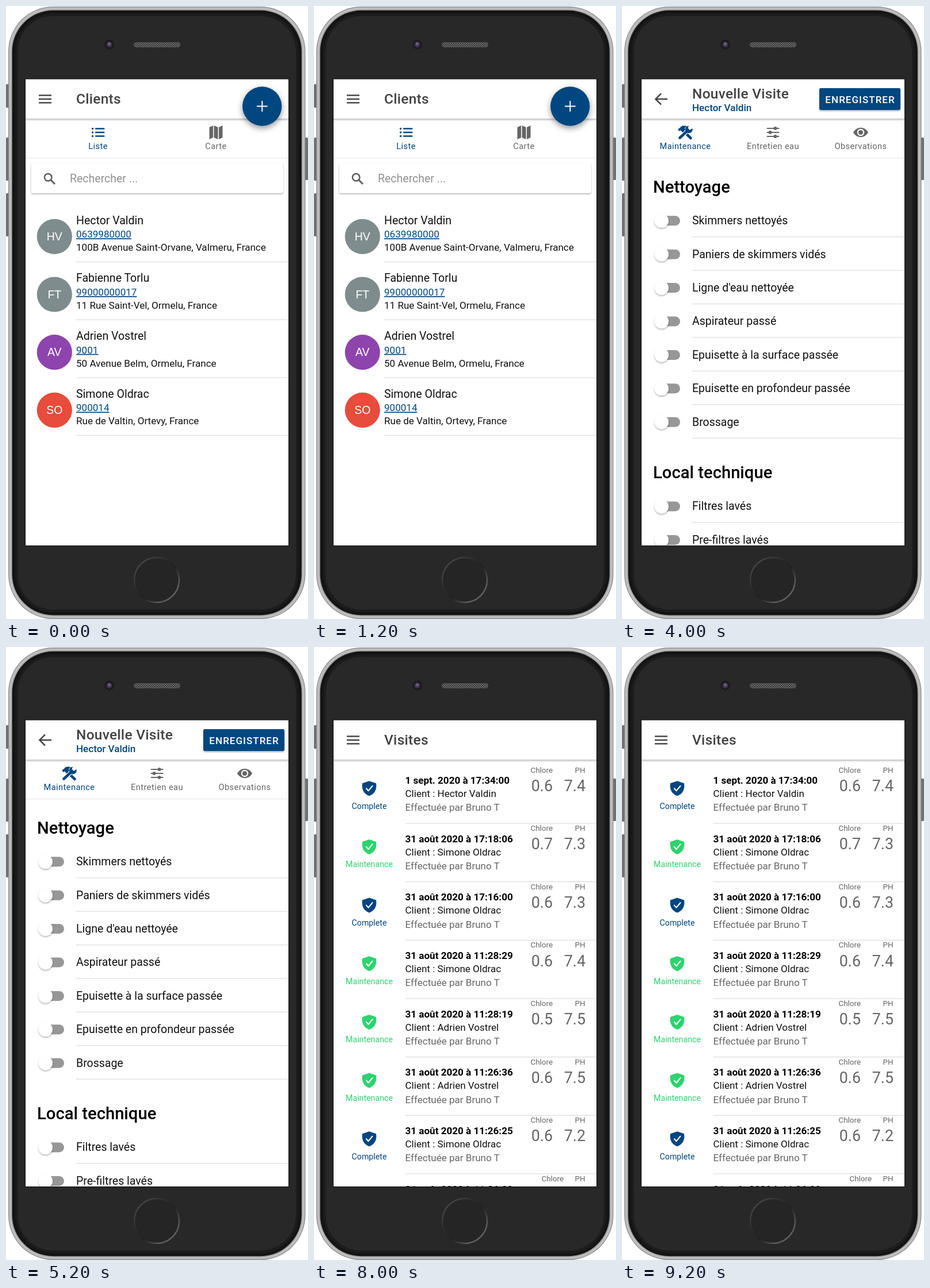
These frames come from a looping animation (525x1067 px, 10000 ms). An HTML page:

```html
<!DOCTYPE html>
<html lang="fr">
<head>
<meta charset="utf-8">
<title>Suivi de piscines</title>
<style>
  html, body { margin: 0; width: 100%; height: 100%; overflow: hidden; background: #fff; }
  svg { display: block; width: 525px; height: 1067px; font-family: Roboto, sans-serif; }
  text { white-space: pre; }
</style>
</head>
<body>
<svg id="stage" viewBox="0 0 525 1067" xmlns="http://www.w3.org/2000/svg"></svg>
<script>
const NAVY = '#004680', GREEN = '#2dd36f', GREY = '#666', INK = '#424242', LINE = '#dcdcdc';
const HOLD = 2000;
// Type sizes of the app, scaled to the stage
const XS = 13.4, S = 14.6, M = 17.06, L = 19.5, XL = 24.4, XXL = 29.2;

const client = 'Hector Valdin', phone = '0639980000';
const address = '100B Avenue Saint-Orvane, Valmeru, France';

const text = (x, y, s, size = L, fill = '#111', o = {}) =>
  `<text x="${x}" y="${y}" font-size="${size}" fill="${fill}" font-weight="${o.w || 400}"` +
  ` text-anchor="${o.a || 'start'}" letter-spacing="${o.ls || 0}em" ${o.x || ''}>${s}</text>`;
const mid = (x, y, s, size, fill, o = {}) => text(x, y, s, size, fill, { ...o, a: 'middle' });
const link = (x, y, s, size) => text(x, y, s, size, NAVY, { x: 'text-decoration="underline"' });
const rect = (x, y, w, h, fill, rx = 0, extra = '') =>
  `<rect x="${x}" y="${y}" width="${w}" height="${h}" rx="${rx}" fill="${fill}" ${extra}/>`;
const circle = (x, y, r, fill, extra = '') => `<circle cx="${x}" cy="${y}" r="${r}" fill="${fill}" ${extra}/>`;
const path = (d, fill, extra = '') => `<path d="${d}" fill="${fill}" ${extra}/>`;
const stroke = (d, color, width = 2, extra = '') =>
  `<path d="${d}" fill="none" stroke="${color}" stroke-width="${width}" ${extra}/>`;
const at = (x, y, body, more = '') => `<g transform="translate(${x} ${y}) ${more}">${body}</g>`;
const rule = (x, y) => rect(x, y - .6, 491 - x, 1.2, LINE);
const heading = (y, s, fill = '#000') => text(54, y, s, XXL, fill, { w: 500 });
const SHADOW = 'filter="url(#shadow)"';

// Icons are drawn around their own centre
const icon = {
  list: c => [-6.5, 0, 6.5].map(y => circle(-9.4, y, 1.7, c) + rect(-5, y - 1.3, 16.5, 2.6, c, 1)).join(''),
  map: c => path('M-11.5-9L-5-12V9L-11.5 12ZM-3.5-12L3.5-9V12L-3.5 9ZM5-9L11.5-12V9L5 12Z', c),
  tools: c => stroke('M-6-5L9.5 10', c, 4.6, 'stroke-linecap="round"') +
    path('M-13-5L-6-11Q-1-13 3-10L-1-8L0-5L-5 0L-8-4L-10-2Z', c) +
    stroke('M-9 9.5L5-4', '#fff', 7) + stroke('M-9.5 9.5L5-4', c, 4.6, 'stroke-linecap="round"') +
    path('M12.5-7A6.4 6.4 0 1 1 6-11.5L4.5-7L7.5-4Z', c),
  sliders: c => [[-7, 4], [0, -5], [7, 4]].map(([y, x]) =>
    rect(-11, y - 1.1, 22, 2.2, c, 1) + circle(x, y, 2.9, c)).join(''),
  eye: c => path('M-13 0C-7-11 7-11 13 0C7 11-7 11-13 0Z', c) + circle(0, 0, 6.2, '#fff') + circle(0, 0, 4.1, c),
  shield: c => path('M0-13L12-9C14 3 8 10 0 13C-8 10-14 3-12-9Z', c) +
    stroke('M-5 0L-1.5 4L5.5-4.5', '#fff', 2.1, 'stroke-linecap="round" stroke-linejoin="round"'),
  thermometer: c => stroke('M-3.2 3V-9A3.2 3.2 0 0 1 3.2-9V3A5.6 5.6 0 1 1-3.2 3Z', c, 1.9) +
    circle(0, 7.3, 3.4, c) + stroke('M0-6V7', c, 2.2),
  bolt: c => stroke('M2-9L-6 2H-.5L-2 9L6-2H.5Z', c, 1.3, 'stroke-linejoin="round"')
};

const menu = [155.5, 162, 168.4].map(y => rect(57, y - 1.2, 22, 2.4, INK)).join('');
const back = stroke('M79 162H59M68 152.4L58.4 162L68 171.6', INK, 2.5);
const header = (left, title, y = 170) =>
  rect(34, 196, 457, 5, 'url(#drop)') + left + text(122, y, title, XL, INK, { w: 500, ls: .0125 });
const tabs = (items, active) => rect(34, 264, 457, 1, '#e6e6e6') + items.map(([x, label, name], i) => {
  const color = i === active ? NAVY : GREY;
  return at(x, 220, icon[name](color)) + mid(x, 249, label, S, color, { ls: .03 });
}).join('');
const button = (x, y, w, h, fill, label, cx, base, size = S, rx = 5) =>
  rect(x, y, w, h, fill, rx, SHADOW) + mid(cx, base, label, size, '#fff', { w: 500, ls: .06 });

function clients() {
  const people = [
    [client, phone, address, 'HV', '#7f8c8d'],
    ['Fabienne Torlu', '99000000017', '11 Rue Saint-Vel, Ormelu, France', 'FT', '#7f8c8d'],
    ['Adrien Vostrel', '9001', '50 Avenue Belm, Ormelu, France', 'AV', '#8e44ad'],
    ['Simone Oldrac', '900014', 'Rue de Valtin, Ortevy, France', 'SO', '#e74c3c']
  ];
  return header(menu, 'Clients') +
    tabs([[160, 'Liste', 'list'], [365, 'Carte', 'map']], 0) +
    circle(445.2, 174.5, 34.2, NAVY, 'filter="url(#lift)"') +
    stroke('M436 174.5H454.6M445.3 165.2V183.8', '#fff', 2) +
    rect(44, 274, 437.5, 51.5, '#fff', 2.4, SHADOW) +
    circle(73.2, 298.2, 6.3, 'none', 'stroke="#5e5e5e" stroke-width="2.5"') +
    stroke('M78 303L85 310', '#5e5e5e', 3) +
    text(111, 306.5, 'Rechercher ...', L, '#929292') +
    people.map(([name, tel, place, initials, color], i) => at(0, i * 100.7,
      circle(84.3, 401.3, 30.6, color) +
      mid(84.3, 408, initials, 19.5, '#fff', { x: 'font-family="Liberation Sans, sans-serif"' }) +
      text(122, 379.5, name) + link(122, 403.3, tel, M) + text(122, 426.3, place, M) + rule(122, 445.4))).join('');
}

function aerial() {
  let seed = 17;
  const rnd = () => (seed = seed * 16807 % 2147483647) / 2147483647;
  const pick = list => list[Math.floor(rnd() * list.length)];
  const blob = (x, y, r, fill, opacity) =>
    `<ellipse cx="${x.toFixed(1)}" cy="${y.toFixed(1)}" rx="${r.toFixed(1)}" ry="${(r * .85).toFixed(1)}" fill="${fill}" opacity="${opacity}"/>`;
  const crowns = ['#343a33', '#3c4338', '#454a3d', '#2f3531', '#3a403c', '#504f43'];
  // Each tree is a dark shadow with a lighter crown beside it
  let trees = '';
  for (let i = 0; i < 650; i++) {
    const x = 34 + rnd() * 457, y = 472 + rnd() * 297, r = 2 + rnd() * 5.5;
    trees += blob(x - r * .6, y - r * .5, r * 1.1, '#191d1d', .6) + blob(x, y, r, pick(crowns), .8);
  }
  // centre, size and tilt of each roof
  const roofs = [
    [296, 510, 22, 32, 8], [411, 486, 38, 22, 12], [111, 558, 38, 26, -8], [432, 559, 40, 28, 10],
    [203, 628, 50, 26, 5], [118, 640, 54, 28, 6], [468, 666, 36, 38, 20], [384, 678, 38, 26, -20],
    [39, 566, 14, 28, 0], [132, 710, 52, 22, 4], [42, 714, 16, 40, 5], [382, 744, 46, 20, -6]
  ];
  const tiles = ['#93594a', '#86594e', '#b36a4b', '#a58a80', '#7d5850', '#968079'];
  const houses = roofs.map(([x, y, w, h, tilt], i) => at(x, y,
    rect(-w / 2 - 5, -h / 2 + 2, w + 12, h + 10, '#77716a', 5, 'opacity=".6"') +
    rect(-w / 2 - 5, -h / 2 - 4, w, h, '#17191b', 2, 'opacity=".7"') +
    rect(-w / 2, -h / 2, w * .6, h * .8, tiles[i % 6]) +
    rect(-w * .1, -h * .3, w * .6, h * .75, tiles[i % 6]) +
    rect(-w / 2, -h * .1, w * .8, h * .3, '#2f2725', 0, 'opacity=".4"') +
    rect(-w / 4, h / 2 - 3, w * .6, 5, '#c3bbb0'), `rotate(${tilt})`)).join('');
  const pools = [[106, 607, 26, 8], [216, 661, 22, 7], [111, 667, 24, 6], [394, 704, 26, 10]]
    .map(([x, y, w, h]) => rect(x - w / 2 - 4, y - h / 2 - 3, w + 8, h + 6, '#a1998d', 4) +
      rect(x - w / 2, y - h / 2, w, h, '#69b9c6', 4)).join('');
  return rect(34, 472, 457, 297, '#30352f') + `<g filter="url(#soft)">${trees}` +
    path('M240 590L325 585L338 635L270 655L238 630Z', '#3c4236', 'opacity=".6"') +
    path('M355 545L410 580L425 635L365 630Z', '#3a4035', 'opacity=".6"') +
    stroke('M54 472L63 600L72 700L68 769', '#606368', 13) +
    stroke('M359 472Q348 525 350 560T346 640Q361 680 357 720L342 769', '#5f605f', 7) +
    stroke('M328 590Q345 625 350 645Q358 668 368 700', '#9a958c', 4) +
    stroke('M80 592L150 604M172 645L238 654M78 696L165 684', '#777168', 4) +
    houses + pools + '</g>' + stroke('M34 599H491M247 472V769', '#ffffff14', 1);
}

function details() {
  const label = (y, s) => text(54, y, s, S, '#222');
  const halo = 'stroke="#222" stroke-width="2.5" paint-order="stroke" stroke-linejoin="round"';
  const dots = [153.5, 162, 170.4].map(y => circle(462, y, 2.6, INK)).join('');
  const map = aerial() +
    text(404, 542, 'B-Manor Vostel', M, '#eee', { w: 500, x: halo }) +
    at(63.5, 531, text(0, 0, 'enue Saint-Orvane', 16, '#eee', { w: 500, x: halo }), 'rotate(90)') +
    path('M262 619C260 603 246 598 246 585A16 16 0 0 1 278 585C278 598 264 603 262 619Z', '#ea4335', 'stroke="#fff" stroke-width="2"') +
    circle(262, 584.5, 5.8, '#811411') +
    rect(47, 484, 236, 48, '#fff', 2.4) + rect(146.5, 484, 1, 48, '#ddd') +
    mid(96.5, 515, 'Map', 21.9, '#666') + mid(214.5, 515, 'Satellite', 21.9, '#000', { w: 500 }) +
    rect(431, 484, 48.5, 48, '#fff', 2.4) +
    stroke('M445.5 504V498.5H451M459 498.5H464.5V504M464.5 512V517.5H459M451 517.5H445.5V512', GREY, 3) +
    rect(431, 691, 48.5, 49, '#fff', 2.4) + rect(446.5, 698, 17, 35, '#f5b326', 8.5) +
    circle(54, 751.5, 10.5, '#fff') +
    rect(101, 752, 390, 17, '#f5f5f5', 0, 'opacity=".68"') +
    text(398, 765, 'Map data ©2020 Imagery ©2020 , Ludra Technologies', 12.2, '#444', { a: 'end' }) +
    rect(404.5, 755, 1, 12, '#555') + text(484, 765, 'Terms of Use', 12.2, '#444', { a: 'end' });
  return header(back, client) + dots +
    label(219.5, 'Telephone mobile') + link(54, 246, phone, L) +
    label(298, 'Telephone fixe') + label(344, 'Email') + link(54, 360, 'hector.val@example.org', L) +
    button(56.5, 370, 252.5, 30, NAVY, 'ACTIVER LE COMPTE CLIENT', 193, 389.5) +
    at(75.5, 385, icon.bolt('#fff')) +
    label(440.5, 'Adresse') + link(54, 466.7, address, L) +
    `<g clip-path="url(#mapClip)">${map}</g>` +
    heading(828, 'Piscines', NAVY) + text(54, 888, 'Principale') +
    rect(144, 863, 149.5, 24.5, NAVY, 5) +
    mid(219, 880, '1 visites éffectuées', 15.8, '#fff', { w: 700 }) +
    text(54, 912, 'Derniere visite effectuee le 1 sept. 2020', M, NAVY) +
    button(56.5, 923, 117, 30, NAVY, 'COMPLETE', 115, 943) +
    button(178, 923, 151, 30, GREEN, 'MAINTENANCE', 253.5, 943);
}

const visitHeader = active => header(back, 'Nouvelle Visite', 161) +
  text(122, 183, client, M, NAVY, { w: 500 }) +
  button(343, 143, 141, 38, NAVY, 'ENREGISTRER', 414, 168.6, M, 2.4) +
  tabs([[110, 'Maintenance', 'tools'], [262.5, 'Entretien eau', 'sliders'], [415, 'Observations', 'eye']], active);

function maintenance() {
  const toggles = (top, labels) => labels.map((s, i) => at(0, top + i * 58.4,
    rect(58, -8.5, 43, 17, '#979797', 8.5) + circle(68.8, 0, 12.2, '#fff', SHADOW) +
    text(122, 6.3, s) + rule(122, 28))).join('');
  return visitHeader(0) + heading(325, 'Nettoyage') +
    toggles(373.8, ['Skimmers nettoyés', 'Paniers de skimmers vidés', "Ligne d'eau nettoyée", 'Aspirateur passé',
      'Epuisette à la surface passée', 'Epuisette en profondeur passée', 'Brossage']) +
    heading(822, 'Local technique') + toggles(871, ['Filtres lavés', 'Pre-filtres lavés']);
}

function water() {
  const scale = (y, cells) => cells.map(([x, w, s, color]) =>
    rect(x, y, w, 54.5, color) + mid(x + w / 2, y + 34, s, L, '#111')).join('');
  const box = (x, y) => rect(x, y, 73, 51, '#fff', 3, `stroke="${NAVY}" stroke-width="2"`);
  const fields = [[127.5, 'Sel'], [262.5, 'TAC'], [398, 'Stabilisant']]
    .map(([x, s]) => mid(x, 782.3, s, L, '#111') + box(x - 36.3, 787.7)).join('');
  return visitHeader(1) + heading(325, 'Analyse') + text(54, 376, 'Chlore') +
    scale(390, [[62, 58, '0.1', '#c7c4d9'], [126, 58, '0.3', '#d2afca'], [190, 57.5, '0.6', '#d09fc4'],
      [253, 45, '1', '#db8ebc'], [304, 58, '1.5', '#e85dac'], [368, 44.5, '2', '#f042a3'], [418, 45, '3', '#f422a1']]) +
    text(54, 502.5, 'PH') +
    scale(517, [[62, 63, '6.8', '#d2ae61'], [130, 62, '7', '#d2ae61'], [198, 62, '7.2', '#e29e63'],
      [266, 61.5, '7.4', '#e8815b'], [333, 62, '7.6', '#ed5b69'], [401, 62, '7.8', '#f03b73']]) +
    rect(62, 576.5, 401, 9, '#f93fa6') +
    text(54, 630, "Temperature de l'eau : 20") +
    at(82, 694.5, icon.thermometer(NAVY), 'scale(.78)') + at(440.5, 694.5, icon.thermometer(NAVY)) +
    mid(118, 699.5, '10', S, '#222') + mid(400, 699.5, '40', S, '#222') +
    rect(143, 693.8, 233, 2, '#abc2d6') + rect(143, 693.8, 78, 2, NAVY) + circle(220.5, 694.8, 7.5, NAVY) +
    fields + rule(34, 852.5) + heading(911, 'Produits introduits') + box(398.5, 936);
}

function visits() {
  const august = '31 août 2020 à ', simone = 'Simone Oldrac', adrien = 'Adrien Vostrel';
  const rows = [
    ['1 sept. 2020 à 17:34:00', client, '0.6', '7.4', true],
    [august + '17:18:06', simone, '0.7', '7.3'],
    [august + '17:16:00', simone, '0.6', '7.3', true],
    [august + '11:28:29', simone, '0.6', '7.4'],
    [august + '11:28:19', adrien, '0.5', '7.5'],
    [august + '11:26:36', adrien, '0.6', '7.5'],
    [august + '11:26:25', simone, '0.6', '7.2', true],
    [august + '11:26:09', simone, '', '', true]
  ];
  const end = (x, y, s, size) => text(x, y, s, size, GREY, { a: 'end' });
  return header(menu, 'Visites') + rows.map(([date, who, chlore, ph, full], i) => {
    const color = full ? NAVY : GREEN;
    return at(0, i * 101.65, at(96, 246.3, icon.shield(color)) +
      mid(96, 281.7, full ? 'Complete' : 'Maintenance', 14.2, color) +
      text(158.5, 238, date, M, '#000', { w: 700 }) + text(158.5, 261, 'Client : ' + who, M) +
      text(158.5, 285.3, 'Effectuée par Bruno T', M, GREY) +
      end(chlore ? 415 : 434, 218.5, 'Chlore', XS) + end(471.5, 218.5, 'PH', XS) +
      end(415, 250.6, chlore, 26.8) + end(472, 250.6, ph, 26.8) + rule(158.5, 307));
  }).join('');
}

const defs = `<defs>
  <filter id="shadow" x="-20%" y="-40%" width="140%" height="190%"><feDropShadow dx="0" dy="1.8" stdDeviation="1.6" flood-opacity=".32"/></filter>
  <filter id="lift" x="-40%" y="-40%" width="180%" height="190%"><feDropShadow dx="0" dy="4" stdDeviation="5.5" flood-opacity=".42"/></filter>
  <filter id="soft"><feGaussianBlur stdDeviation=".6"/></filter>
  <linearGradient id="drop" x2="0" y2="1"><stop stop-color="#bbb"/><stop offset=".5" stop-color="#e4e4e4"/><stop offset="1" stop-color="#fff"/></linearGradient>
  <linearGradient id="home" x2="1" y2="1"><stop stop-color="#555"/><stop offset=".3" stop-color="#333"/><stop offset=".55" stop-color="#1e1e1e"/><stop offset=".75" stop-color="#555"/><stop offset="1" stop-color="#777"/></linearGradient>
  <pattern id="mesh" width="4" height="4" patternUnits="userSpaceOnUse"><rect width="4" height="4" fill="#3a3a3a"/><path d="M0 0h2v2h2v2h-2v-2h-2z" fill="#686868"/></pattern>
  <clipPath id="screen"><rect x="34" y="127.5" width="457" height="811.5"/></clipPath>
  <clipPath id="mapClip"><rect x="34" y="472" width="457" height="297"/></clipPath>
</defs>`;

// Nested rounded outlines of the case, from the metal rim to the glass
const shell = (inset, fill) =>
  rect(4 + inset, 1 + inset, 516.5 - 2 * inset, 1066 - 2 * inset, fill, 78 - inset);

const device =
  [[0, 136, 41], [0, 229, 75], [0, 326, 75], [519, 229, 74]].map(([x, y, h]) => rect(x, y, 6, h, '#707070', 1.5)).join('') +
  shell(0, '#8a8a8a') + shell(1.2, '#bdbdbd') + shell(5.5, '#8c8c8c') + shell(6.8, '#141414') +
  shell(12, '#1c1c1c') + shell(16.5, '#282828') +
  circle(179.5, 67, 8.5, '#1b1b1d') + circle(179.5, 67, 5, '#3f3550') + circle(179.5, 66, 2.2, '#76658e') +
  rect(222, 63, 81, 9, 'url(#mesh)', 4.5) +
  circle(262, 999, 39, '#252525', 'stroke="url(#home)" stroke-width="2.4"') +
  rect(33, 126.5, 459, 813.5, '#111') + rect(34, 127.5, 457, 811.5, '#fff');

const scenes = [clients, details, maintenance, water, visits];
const stage = document.getElementById('stage');
stage.innerHTML = defs + device +
  `<g clip-path="url(#screen)">${scenes.map(draw => `<g class="scene" opacity="0">${draw()}</g>`).join('')}</g>`;

const loop = HOLD * scenes.length;
stage.querySelectorAll('.scene').forEach((scene, i) => scene.animate([
  { opacity: 1, offset: 0, easing: 'step-end' },
  { opacity: 0, offset: 1 / scenes.length, easing: 'step-end' },
  { opacity: 0, offset: 1 }
], { duration: loop, delay: i * HOLD - loop, iterations: Infinity }));
</script>
</body>
</html>
```
